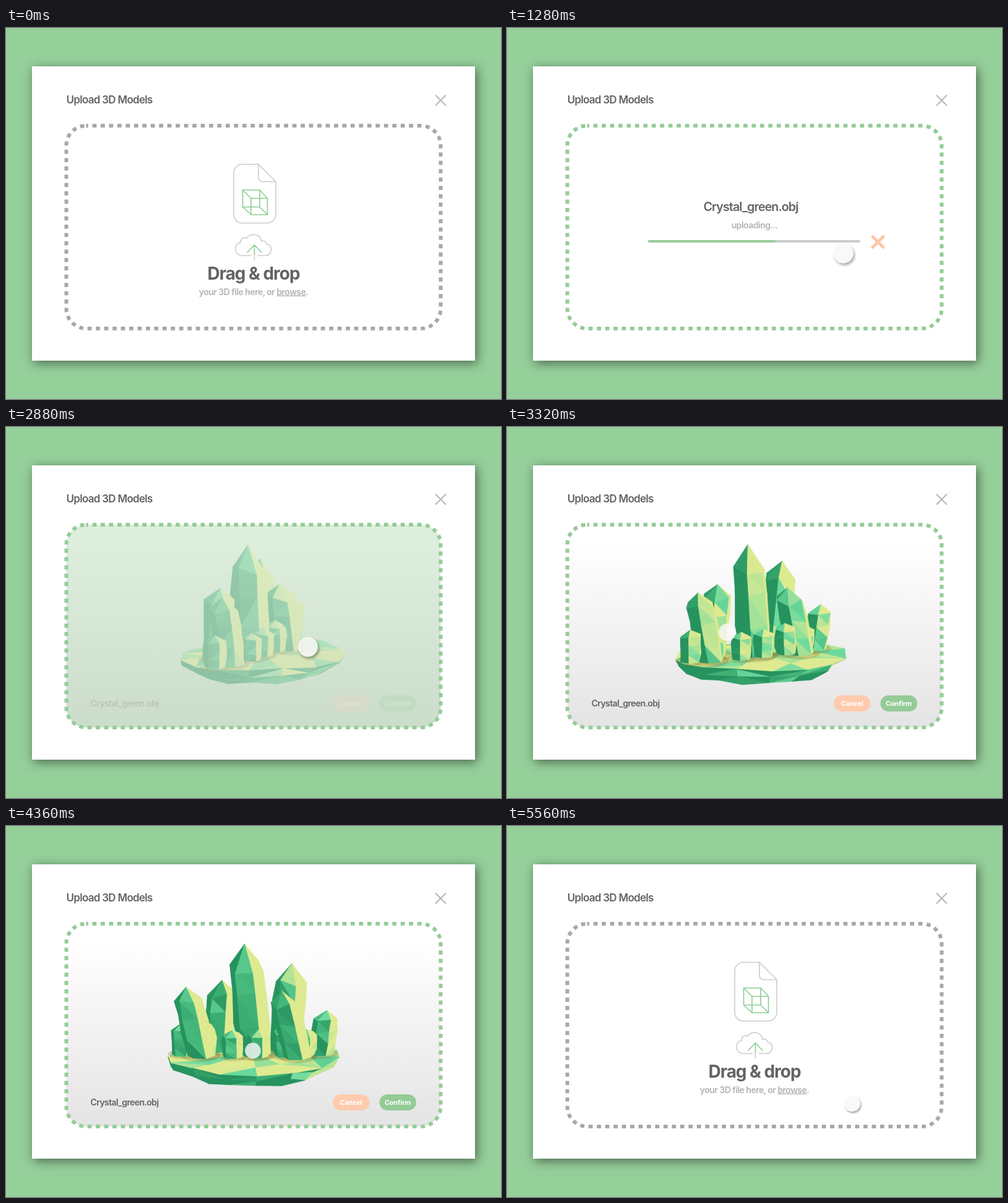
Recreate the animation shown at these times as an HTML page with a canvas. Size 800 px wide and 600 px high, loop 5640 ms.

```html
<!DOCTYPE html>
<html lang="en">
<head>
<meta charset="utf-8">
<title>Upload 3D Models</title>
<style>
  html, body { margin: 0; width: 100%; height: 100%; overflow: hidden; background: #95cf9a; }
  #stage { position: relative; width: 800px; height: 600px; overflow: hidden; }
  #stage > * { position: absolute; left: 0; top: 0; }
  #stage > #card {
    left: 42px; top: 62px; width: 716px; height: 476px; background: #fff;
    box-shadow: 3px 4px 16px rgba(0, 0, 0, .5);
  }
  svg { width: 800px; height: 600px; }
  text {
    font-family: Inter, "Liberation Sans", sans-serif; font-weight: 600;
    font-optical-sizing: none; letter-spacing: -.037em; fill: #636363;
  }
  .soft { fill: #b3b3b3; font-size: 14px; }
  .mid { text-anchor: middle; }
  .title { font-size: 17px; letter-spacing: -.042em; }
  .big { font-size: 28px; font-weight: 700; }
  .name { letter-spacing: -.045em; }
  .pill { font-size: 11px; font-weight: 700; letter-spacing: -.02em; fill: #fff; }
  .line { fill: none; stroke: #ccc; stroke-width: 1.6; }
  .green { stroke: #8bcd92; }
  #cursor {
    width: 32px; height: 32px; margin: -16px 0 0 -16px; border-radius: 50%;
    background: rgba(248, 248, 248, .82);
  }
</style>
</head>
<body>
<div id="stage">
  <div id="card"></div>
  <svg viewBox="0 0 800 600">
    <defs>
      <linearGradient id="floor" x1="0" y1="0" x2="0" y2="1">
        <stop offset=".08" stop-color="#fff"/>
        <stop offset="1" stop-color="#e4e4e4"/>
      </linearGradient>
    </defs>
    <text class="title" x="97.5" y="121.5">Upload 3D Models</text>
    <path d="M694 108.5l17 17M711 108.5l-17 17" stroke="#b5b5b5" stroke-width="2"/>

    <g id="idle">
      <path class="line" d="M408 220.5H382a14 14 0 0 0-14 14V301.5a14 14 0 0 0 14 14H422a14 14 0 0 0 14-14V248.5L408 220.5V242a6.5 6.5 0 0 0 6.5 6.5H436"/>
      <path class="line green" d="M382.5 262h27.5v27.5h-27.5zM396 275.5h26.5v26.5H396zM382.5 262L396 275.5M410 262l12.5 13.5M410 289.5l12.5 12.5M382.5 289.5L396 302"/>
      <path class="line" d="M397 368H382C368 368 367 349 379 347C379 339 386 338 389 340C394 331 411 332 413 345C417 343 421 346 421 349C432 351 431 368 419 368H407M401.5 364V376"/>
      <path class="line green" d="M401.5 366V351M389.5 363.5l12-12.5l12 12.5"/>
      <text class="big mid" x="400" y="407">Drag &amp; drop</text>
      <text class="soft mid" x="400" y="431.5">your 3D file here, or <tspan text-decoration="underline">browse</tspan>.</text>
    </g>

    <g id="upload">
      <text class="name" x="317.5" y="296" font-size="19.6">Crystal_green.obj</text>
      <text class="soft mid" x="400" y="324">uploading...</text>
      <rect x="228" y="343" width="343" height="4" rx="2" fill="#ccc"/>
      <path d="M591 337.5l17 17M608 337.5l-17 17" stroke="#ffc6a6" stroke-width="5" stroke-linecap="round"/>
    </g>

    <rect id="room" x="97.5" y="158" width="605" height="328" rx="32" fill="url(#floor)"/>
    <rect id="bar" fill="#99cc99"/>
    <rect id="border" x="97.5" y="158" width="605" height="328" rx="32" fill="none"
      stroke-width="6" stroke-dasharray="6.7325" stroke-dashoffset="3.366"/>
  </svg>
  <canvas id="model" width="800" height="600"></canvas>
  <svg viewBox="0 0 800 600">
    <g id="actions">
      <text class="name" x="136.5" y="452" font-size="14.1">Crystal_green.obj</text>
      <rect x="528" y="434" width="59.5" height="26" rx="13" fill="#ffcbae"/>
      <text class="pill mid" x="557.5" y="451">Cancel</text>
      <rect x="603.5" y="434" width="59.5" height="26" rx="13" fill="#94cb97"/>
      <text class="pill mid" x="633" y="451">Confirm</text>
    </g>
  </svg>
  <div id="cursor"></div>
</div>

<script>
const LOOP = 5640, RESET = 5520;
const el = id => document.getElementById(id);
const clamp = v => Math.max(0, Math.min(1, v));
const mix = (a, b, p) => a + (b - a) * p;
const wave = p => .5 - .5 * Math.cos(Math.PI * p);
const span = (t, a, b) => clamp((t - a) / (b - a));
const ease = (t, a, b) => wave(span(t, a, b));
const show = (id, v) => { el(id).style.opacity = v; };
const setRect = (id, values) => {
  for (const k in values) el(id).setAttribute(k, values[k]);
};

// Eased value list at time t; each key is [time, ...values].
function track(keys, t) {
  const i = keys.findIndex(k => k[0] > t);
  if (i === 0) return keys[0].slice(1);
  if (i < 0) return keys[keys.length - 1].slice(1);
  const a = keys[i - 1], b = keys[i], p = ease(t, a[0], b[0]);
  return a.slice(1).map((v, n) => mix(v, b[n + 1], p));
}

// time, x, y of the pointer
const PATH = [
  [80, 825, 625], [640, 543, 364], [2620, 546, 366], [3320, 356, 332],
  [3920, 386, 396], [4800, 412, 331], [5320, 558, 449]
];
// time, yaw, pitch, roll of the model
const POSE = [[2680, 1.1, .2, 0], [3320, .4, .2, 0], [3920, -.35, .3, .06], [4800, 0, .2, 0]];

// ---- crystal model ----
const GROUND = 369;
let seed = 11;
const rnd = () => (seed = (seed * 16807) % 2147483647) / 2147483647;
const jit = a => (rnd() * 2 - 1) * a;
const dot = (a, b) => a.reduce((s, v, i) => s + v * b[i], 0);
const minus = (a, b) => a.map((v, i) => v - b[i]);
const circle = (n, point) =>
  Array.from({ length: n }, (_, i) => point((i + .5) / n * 2 * Math.PI));

function tri(center, a, b, c, spread) {
  const u = minus(b, a), w = minus(c, a);
  const n = [u[1] * w[2] - u[2] * w[1], u[2] * w[0] - u[0] * w[2], u[0] * w[1] - u[1] * w[0]];
  const len = Math.hypot(...n) * (dot(n, minus(a, center)) < 0 ? -1 : 1) || 1;
  return { pts: [a, b, c], n: n.map(v => v / len), tint: jit(spread) };
}

const band = (center, low, high, spread) => low.flatMap((p, i) => {
  const j = (i + 1) % low.length;
  const [x, y] = i % 2 ? [high[i], low[j]] : [high[j], p];
  return [tri(center, p, low[j], x, spread), tri(center, y, high[j], high[i], spread)];
});

const fan = (center, ring, tip, spread) =>
  ring.map((p, i) => tri(center, p, ring[(i + 1) % ring.length], tip, spread));

// A leaning six-sided prism with a pointed end; taller ones are thicker.
function crystal([tipX, tipY, footX, z]) {
  const x = footX - 400, lean = tipX - footX;
  const h = (GROUND - tipY + .2 * z) / .98, r = 6 + 14 * Math.sqrt(h / 60);
  const center = [x + lean / 2, h / 2, z];
  const ring = (f, size, rough) => circle(6, a => {
    const q = r * size * (1 + jit(.09)), g = f + jit(rough);
    return [x + lean * g + q * Math.sin(a), h * g, z + q * Math.cos(a)];
  });
  const rings = [0, .28, .55, .8].map(f => ring(f, .86 + .4 * f * (1 - f), f && .05));
  const faces = rings.slice(1).flatMap((top, i) => band(center, rings[i], top, .17));
  return {
    foot: [x, 0, z], r,
    faces: [...faces, ...fan(center, rings[3], [x + lean, h, z], .2)]
  };
}

function island() {
  const center = [0, -10, 15];
  const ring = (size, y, rough) => circle(15, a => {
    const q = size * (1 + jit(.05));
    return [142 * q * Math.sin(a), y + jit(rough), 15 + 130 * q * Math.cos(a)];
  });
  const low = ring(.74, -25, 4), edge = ring(.92, -11, 4), rim = ring(.99, 0, 5);
  const inner = ring(.68, 5, 5);
  return [
    ...band(center, low, edge, .45), ...band(center, edge, rim, .5),
    ...band(center, rim, inner, .4), ...fan(center, inner, [0, 7, 15], .25)
  ];
}

const BASE = island();
// tip x, tip y, foot x, depth
const TALL = [
  [390, 189, 402, -4], [295, 260, 316, 14], [347, 250, 338, -28],
  [462, 221, 446, -32], [452, 264, 475, 14], [521, 296, 510, -10]
];
const SMALL = Array.from({ length: 6 }, (_, i) => {
  const x = 286 + 40 * i + jit(6);
  return [x, 322 + jit(8), x + jit(5), 18 - 6 * Math.abs(i - 2)];
});
const CRYSTALS = [...TALL, ...SMALL].map(crystal);

const RAMP = [[38, 146, 94], [62, 176, 116], [108, 218, 158], [222, 234, 144]];
function shade(v) {
  const u = clamp(v) * (RAMP.length - 1), i = Math.min(RAMP.length - 2, Math.floor(u));
  return `rgb(${RAMP[i].map((c, k) => Math.round(mix(c, RAMP[i + 1][k], u - i)))})`;
}

const ctx = el("model").getContext("2d");
function drawModel(t) {
  const [cy, sy, cp, sp, cr, sr] = track(POSE, t).flatMap(a => [Math.cos(a), Math.sin(a)]);
  const turn = ([x, y, z]) => {
    const x1 = x * cy + z * sy, z1 = z * cy - x * sy;
    const y1 = y * cp - z1 * sp;
    return [x1 * cr - y1 * sr, x1 * sr + y1 * cr, z1 * cp + y * sp];
  };
  const place = p => [400 + p[0], GROUND - p[1]];
  const depth = f => f.pts.reduce((s, p) => s + p[2], 0);
  const paint = faces => faces
    .map(f => ({ n: turn(f.n), pts: f.pts.map(turn), tint: f.tint }))
    .filter(f => f.n[2] > 0)
    .sort((a, b) => depth(a) - depth(b))
    .forEach(f => {
      // Light falls from the right and a little from above.
      ctx.fillStyle = ctx.strokeStyle = shade(.52 + .9 * f.n[0] + .45 * f.n[1] + f.tint);
      ctx.beginPath();
      f.pts.forEach(p => ctx.lineTo(...place(p)));
      ctx.closePath();
      ctx.fill();
      ctx.stroke();
    });

  ctx.clearRect(0, 0, 800, 600);
  ctx.lineWidth = .7;
  ctx.lineJoin = "round";
  paint(BASE);
  const order = CRYSTALS.map(c => ({ ...c, at: turn(c.foot) })).sort((a, b) => a.at[2] - b.at[2]);
  ctx.fillStyle = "rgba(110,110,50,.25)";
  for (const c of order) {
    ctx.beginPath();
    ctx.ellipse(...place(c.at), c.r * 1.25, c.r * .4, 0, 0, 7);
    ctx.fill();
  }
  order.forEach(c => paint(c.faces));
}

// ---- scene ----
function render(t) {
  const done = t >= RESET;
  show("idle", done ? 1 : 1 - span(t, 640, 760));
  show("upload", done ? 0 : span(t, 740, 860) * (1 - span(t, 1920, 2080)));

  const hot = done ? 0 : ease(t, 480, 700);
  setRect("border", { stroke: `rgb(${mix(168, 148, hot)},${mix(168, 204, hot)},${mix(168, 151, hot)})` });

  // The finished bar swells into the preview area.
  const load = 1 - Math.pow(1 - span(t, 800, 1900), 1.6);
  const grow = ease(t, 2293, 2743);
  const w = mix(343 * load, 605, grow), h = mix(4, 328, grow);
  setRect("bar", {
    x: mix(228, 97.5, grow), y: mix(345, 322, grow) - h / 2,
    width: w, height: h, rx: mix(2, 32, grow * grow)
  });
  show("bar", done ? 0 : span(t, 760, 840) * (1 - span(t, 2720, 2960)));

  const preview = !done && t >= 2743;
  show("room", preview ? 1 : 0);
  show("model", preview ? span(t, 2780, 3040) : 0);
  show("actions", preview ? span(t, 2840, 3040) : 0);
  if (preview) drawModel(t);

  // The pointer shrinks while pressed and lies flat while it turns the model.
  const [x, y] = track(PATH, t);
  const turning = ease(t, 3060, 3500) * (1 - ease(t, 4640, 4860));
  const press = Math.max(turning, 1 - ease(t, 640, 760), ease(t, 5340, 5440));
  const cursor = el("cursor").style;
  cursor.opacity = t < 80 ? 0 : 1;
  cursor.transform = `translate(${x}px,${y}px) scale(${1 - .2 * press})`;
  cursor.boxShadow = `2px 3px 4px rgba(0,0,0,${.36 - .3 * ease(t, 3040, 3200) * (1 - ease(t, 4800, 4920))})`;
}

const start = performance.now();
function tick() {
  render((performance.now() - start) % LOOP);
  requestAnimationFrame(tick);
}
tick();
</script>
</body>
</html>
```
